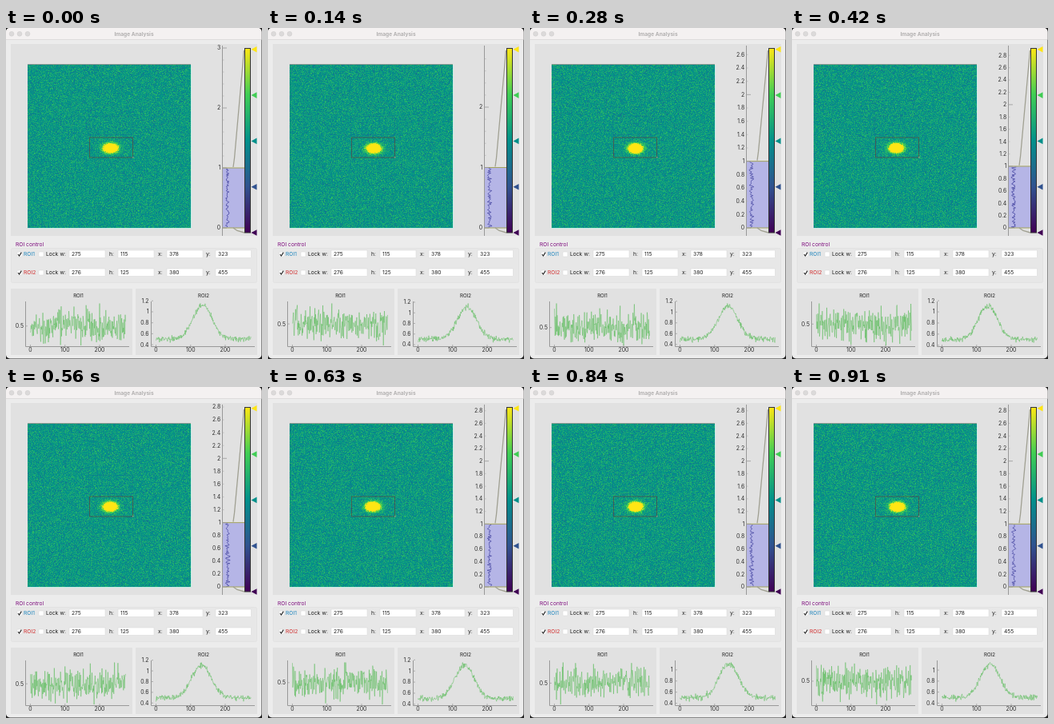
Write an HTML page with a canvas that moves like this. It is 320 by 414 pixels and loops after 980 ms.

```html
<!DOCTYPE html>
<html lang="en">
<head>
<meta charset="utf-8">
<title>Image Analysis</title>
<style>
  html, body { margin: 0; width: 100%; height: 100%; overflow: hidden; background: #222; }
  svg, canvas { position: absolute; left: 0; top: 0; width: 320px; height: 414px; }
  text { font: 6.7px Inter, "Liberation Sans", sans-serif; fill: #1c1c1c; }
  .title { font-size: 6.6px; font-weight: 700; fill: #b2b0b0; }
  .mid { text-anchor: middle; }
  .plot { font-size: 6.1px; }
  .field { fill: #fff; stroke: #d6d6d6; stroke-width: .5; }
  .check { fill: none; stroke: #222; stroke-width: 1.1; }
</style>
</head>
<body>
<svg viewBox="0 0 320 414">
  <rect width="319.5" height="413.4" rx="5" fill="#ececec"/>
  <path d="M0 14V5Q0 0 5 0H314.5Q319.5 0 319.5 5V14Z" fill="#f4f1f1"/>
  <path d="M0 14.5H319.5" stroke="#dedcdc"/>
  <g fill="#dcdada" stroke="#cbc9c9" stroke-width=".5">
    <circle cx="7" cy="7.3" r="2.9"/><circle cx="17" cy="7.3" r="2.9"/><circle cx="27" cy="7.3" r="2.9"/>
  </g>
  <text class="title mid" x="160" y="9.6">Image Analysis</text>

  <g fill="#e1e1e1">
    <rect x="6" y="20" width="308" height="240"/>
    <rect x="6" y="326" width="152" height="83"/>
    <rect x="162" y="326" width="152" height="83"/>
  </g>
  <rect x="6.5" y="275.5" width="307" height="43" rx="2" fill="#e7e7e7" stroke="#e2e2e2"/>
  <text x="12" y="272.5" style="fill:#7c0a7c">ROI control</text>

  <defs>
    <g id="row">
      <rect class="field" x="14" y="-3" width="6" height="6" rx="1"/>
      <path class="check" d="M15 .2L16.6 2L19.3 -2.4"/>
      <rect class="field" x="41" y="-3" width="6" height="6" rx="1"/>
      <text x="50" y="2.4">Lock</text>
      <text x="67.5" y="2.4">w:</text><rect class="field" x="79" y="-5" width="45" height="9.5"/>
      <text x="129" y="2.4">h:</text><rect class="field" x="140" y="-5" width="45" height="9.5"/>
      <text x="190" y="2.4">x:</text><rect class="field" x="201" y="-5" width="45" height="9.5"/>
      <text x="250" y="2.4">y:</text><rect class="field" x="262" y="-5" width="44.5" height="9.5"/>
    </g>
  </defs>
  <g transform="translate(0 283)">
    <use href="#row"/>
    <text x="22" y="2.4" style="fill:#1f86bd">ROI1</text>
    <text x="82" y="2.4">275</text><text x="143" y="2.4">115</text>
    <text x="204" y="2.4">378</text><text x="265" y="2.4">323</text>
  </g>
  <g transform="translate(0 306)">
    <use href="#row"/>
    <text x="22" y="2.4" style="fill:#d22f2f">ROI2</text>
    <text x="82" y="2.4">276</text><text x="143" y="2.4">125</text>
    <text x="204" y="2.4">380</text><text x="265" y="2.4">455</text>
  </g>

  <text class="plot mid" x="90.5" y="336.6">ROI1</text>
  <text class="plot mid" x="247" y="336.6">ROI2</text>
</svg>
<canvas id="view" width="320" height="414"></canvas>
<script>
const ctx = document.getElementById('view').getContext('2d');
const STEP = 70, STEPS = 14;
const ZERO = 250;    // y of value 0 in the histogram
const UNIT = 0.4325; // plot pixels per sample
const SAMPLES = 276;

// brightest pixel value, one key for every two steps
const peakKeys = [3, 2.98, 2.7, 2.92, 2.8, 2.92, 2.86];

const viridis = [[64, 0, 84], [48, 82, 143], [2, 144, 138], [64, 205, 84], [255, 230, 20]];
const css = c => `rgb(${c})`;

// 256-entry colour lookup
const lut = Array.from({ length: 256 }, (_, i) => {
  const p = i / 255 * 4, k = Math.min(3, Math.floor(p));
  return viridis[k].map((a, j) => a + (viridis[k + 1][j] - a) * (p - k));
});

function random(seed) {
  return () => {
    seed = seed + 0x6D2B79F5 | 0;
    let t = Math.imul(seed ^ seed >>> 15, 1 | seed);
    t = t + Math.imul(t ^ t >>> 7, 61 | t) ^ t;
    return ((t ^ t >>> 14) >>> 0) / 4294967296;
  };
}

function peakAt(step) {
  const k = Math.floor(step / 2), next = Math.min(k + 1, peakKeys.length - 1);
  return peakKeys[k] + (peakKeys[next] - peakKeys[k]) * (step % 2) / 2;
}

function line(points, color, width = 1) {
  ctx.beginPath();
  points.forEach(p => ctx.lineTo(p[0], p[1]));
  ctx.strokeStyle = color;
  ctx.lineWidth = width;
  ctx.stroke();
}

function box(x, y, w, h, color) {
  ctx.lineWidth = 1;
  ctx.strokeStyle = color;
  ctx.strokeRect(x, y, w, h);
}

function label(text, x, y, align) {
  ctx.font = '6.9px Inter, "Liberation Sans", sans-serif';
  ctx.textAlign = align;
  ctx.fillStyle = '#2a2a2a';
  ctx.fillText(text, x, y + 2.4);
}

function drawImage(rnd, cx, cy) {
  const size = 204, img = ctx.createImageData(size, size);
  for (let y = 0, i = 0; y < size; y++) {
    const dy = (y + 46 - cy) / 3.6;
    for (let x = 0; x < size; x++, i += 4) {
      const dx = (x + 27 - cx) / 5.5;
      const v = 0.53 + (rnd() + rnd() + rnd() - 1.5) * 0.13
        + 1.7 * Math.exp(-(dx * dx + dy * dy) / 2);
      img.data.set(lut[Math.min(255, Math.max(0, Math.round(v * 255)))], i);
      img.data[i + 3] = 255;
    }
  }
  ctx.putImageData(img, 27, 46);
  line([[27, 45.5], [231, 45.5]], '#8a9a92');
  line([[231.5, 46], [231.5, 250.5], [27, 250.5]], '#c4ebe4');
  box(103.5, 110.5, 55, 23, 'rgba(20,85,150,.2)');
  box(104.5, 137, 54, 25, 'rgba(95,65,60,.65)');
  ctx.fillStyle = '#8f9a8a';
  ctx.fillRect(158, 161, 1.5, 1.5);
}

function drawHistogram(rnd, scale) {
  const top = ZERO - scale;
  ctx.fillStyle = '#b5b5e6';
  ctx.fillRect(271, top, 27, scale);

  const bins = [];
  for (let y = top + 1; y < ZERO; y += 1) bins.push([273.5 + rnd() * 2.5 + rnd() * 4.5, y]);
  line(bins, '#4a4aa4', 0.8);

  for (const y of [top, ZERO]) line([[271, y], [298, y]], '#a3a35c');
  line([[284, top - 1], [285.5, top - 12], [297.5, 28]], '#a0a092', 1.3);
  line([[284, ZERO], [289, 253.5], [298, 256]], '#a0a092', 1.3);

  line([[270.5, 22], [270.5, 260]], '#999');
  for (let i = 0; ZERO - i / 5 * scale > 23.5; i++) {
    const y = ZERO - i / 5 * scale, major = i % 5 === 0;
    line([[271, y], [major ? 276 : 272.5, y]], major ? '#999' : '#bbb', 0.8);
    if (major || scale > 76) label(String(i / 5), 268.2, y, 'right');
  }

  const bar = ctx.createLinearGradient(0, 256, 0, 25);
  viridis.forEach((c, i) => bar.addColorStop(i / 4, css(c)));
  ctx.fillStyle = bar;
  ctx.fillRect(298.5, 25.5, 7, 230.5);
  box(298.5, 25.5, 7, 230.5, '#333');
  viridis.forEach((c, i) => {
    const y = 256 - i * 57.3;
    ctx.beginPath();
    ctx.moveTo(306.5, y);
    ctx.lineTo(313.5, y - 3.8);
    ctx.lineTo(313.5, y + 3.8);
    ctx.fillStyle = css(c);
    ctx.fill();
  });
}

// Fits the values into the plot's height, like an auto-ranging axis.
function drawPlot(left, base, bottom, tick, values) {
  const low = Math.min(...values), high = Math.max(...values);
  const yOf = v => bottom + (344.5 - bottom) * (v - low) / (high - low);
  const xOf = n => left + 6.5 + n * UNIT;

  line([[left + 0.5, 342], [left + 0.5, 398.5], [left + 130, 398.5]], '#999');
  for (const n of [0, 100, 200]) {
    line([[xOf(n), 398], [xOf(n), 396]], '#999', 0.7);
    label(String(n), xOf(n), 402.7, 'center');
  }
  for (let i = tick; i < 13; i += tick) {
    const y = yOf(i / 10);
    if (y < 341 || y > 397.5) continue;
    line([[left + 1, y], [left + 3, y]], '#999', 0.7);
    label(String(i / 10), base, y, 'right');
  }
  line(values.map((v, n) => [xOf(n), yOf(v)]), '#4cb84c', 0.45);
}

function draw(step) {
  const rnd = random(step * 7919 + 17);
  const x = 130.7 + 1.1 * Math.sin(2 * Math.PI * (step - 0.4) / 9);
  const y = 149.6 + 0.6 * Math.cos(2 * Math.PI * (step - 3) / STEPS);
  const center = (x - 103.5) * 5;
  const noise = () => 0.5 + (rnd() + rnd() + rnd() + rnd() - 2) * 0.046;
  const flat = Array.from({ length: SAMPLES }, noise);
  const bell = flat.map((_, n) => noise() + 0.61 * Math.exp(-(((n - center) / 28) ** 2) / 2));

  ctx.clearRect(0, 0, 320, 414);
  drawImage(rnd, x, y);
  drawHistogram(rnd, 225 / peakAt(step));
  drawPlot(24, 22, 397, 1, flat);
  drawPlot(181, 178.5, 393.5, 2, bell);
}

let shown = -1;
function tick() {
  const step = Math.floor(performance.now() / STEP) % STEPS;
  if (step !== shown) draw(shown = step);
  requestAnimationFrame(tick);
}
tick();
</script>
</body>
</html>
```
